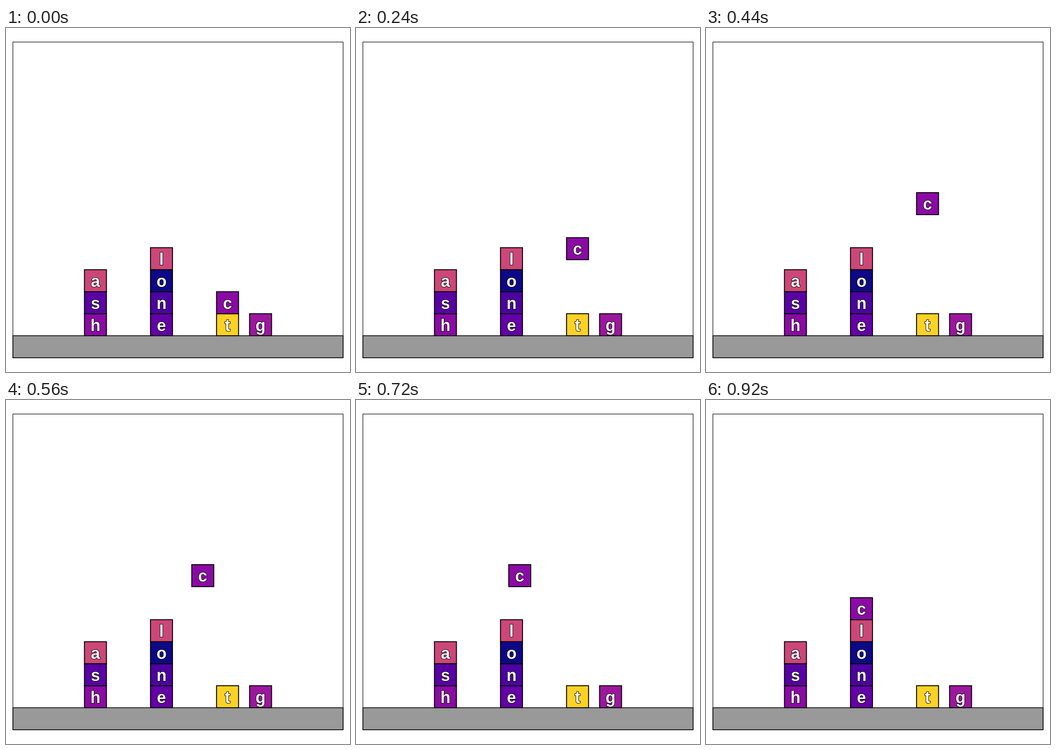
These frames come from a looping animation (748 px wide and 748 px high, 0.96 s). An HTML page with a canvas:

```html
<!DOCTYPE html>
<html lang="en">
<head>
<meta charset="utf-8">
<title>Stacking letter blocks</title>
<style>
  html, body { margin: 0; width: 100%; height: 100%; overflow: hidden; background: #fff; }
  canvas { display: block; }
</style>
</head>
<body>
<canvas id="stage" width="748" height="748"></canvas>
<script>
const ctx = document.getElementById('stage').getContext('2d');
const UNIT = 47.87, LEFT = 15, RIGHT = 733, TOP = 30.5, BOTTOM = 717;
const STEP_MS = 40, STEPS = 24;
const HOVER = 6.5, LIFT = 11, SLIDE = 8, DROP = 4;

const colors = {
  a: '#cc4778', s: '#5901a5', h: '#8b0aa5',
  l: '#cc4778', o: '#0d0887', n: '#4c02a1', e: '#6400a7',
  c: '#8b0aa5', t: '#fcd225', g: '#9c179e'
};
// Letters run from the bottom up; column positions are in units.
const stacks = [[3.25, 'hsa'], [6.25, 'enol'], [9.25, 't'], [10.75, 'g']];

const clamp01 = v => Math.min(1, Math.max(0, v));

function box(x, y, w, h, fill, lineWidth) {
  ctx.fillStyle = fill;
  ctx.fillRect(x, y, w, h);
  ctx.strokeStyle = '#000';
  ctx.lineWidth = lineWidth;
  ctx.strokeRect(x, y, w, h);
}

function block(letter, col, row) {
  const x = LEFT + col * UNIT, y = BOTTOM - (row + 1) * UNIT;
  box(x, y, UNIT, UNIT, colors[letter], 2);
  ctx.lineWidth = 2;
  ctx.strokeText(letter, x + UNIT / 2, y + 37.5);
  ctx.fillStyle = '#fff';
  ctx.fillText(letter, x + UNIT / 2, y + 37.5);
}

function draw(now) {
  const step = Math.floor(now / STEP_MS) % STEPS;
  const lift = clamp01(step / LIFT);
  const slide = clamp01((step - LIFT) / SLIDE);
  const drop = clamp01((step - LIFT - SLIDE) / DROP);

  ctx.font = 'bold 36px "Liberation Sans", Arial, sans-serif';
  ctx.textAlign = 'center';
  ctx.lineJoin = 'miter';
  ctx.miterLimit = 3;
  box(LEFT, TOP, RIGHT - LEFT, BOTTOM - TOP, '#fff', 1.2);
  box(LEFT, BOTTOM - UNIT, RIGHT - LEFT, UNIT, '#999', 1.6);
  for (const [col, letters] of stacks)
    [...letters].forEach((letter, i) => block(letter, col, i + 1));
  block('c', 9.25 - 3 * slide, 2 + (HOVER - 2) * lift - (HOVER - 5) * drop);
}

const start = performance.now();
function tick() {
  ctx.clearRect(0, 0, 748, 748);
  draw(performance.now() - start);
  requestAnimationFrame(tick);
}
tick();
</script>
</body>
</html>
```
